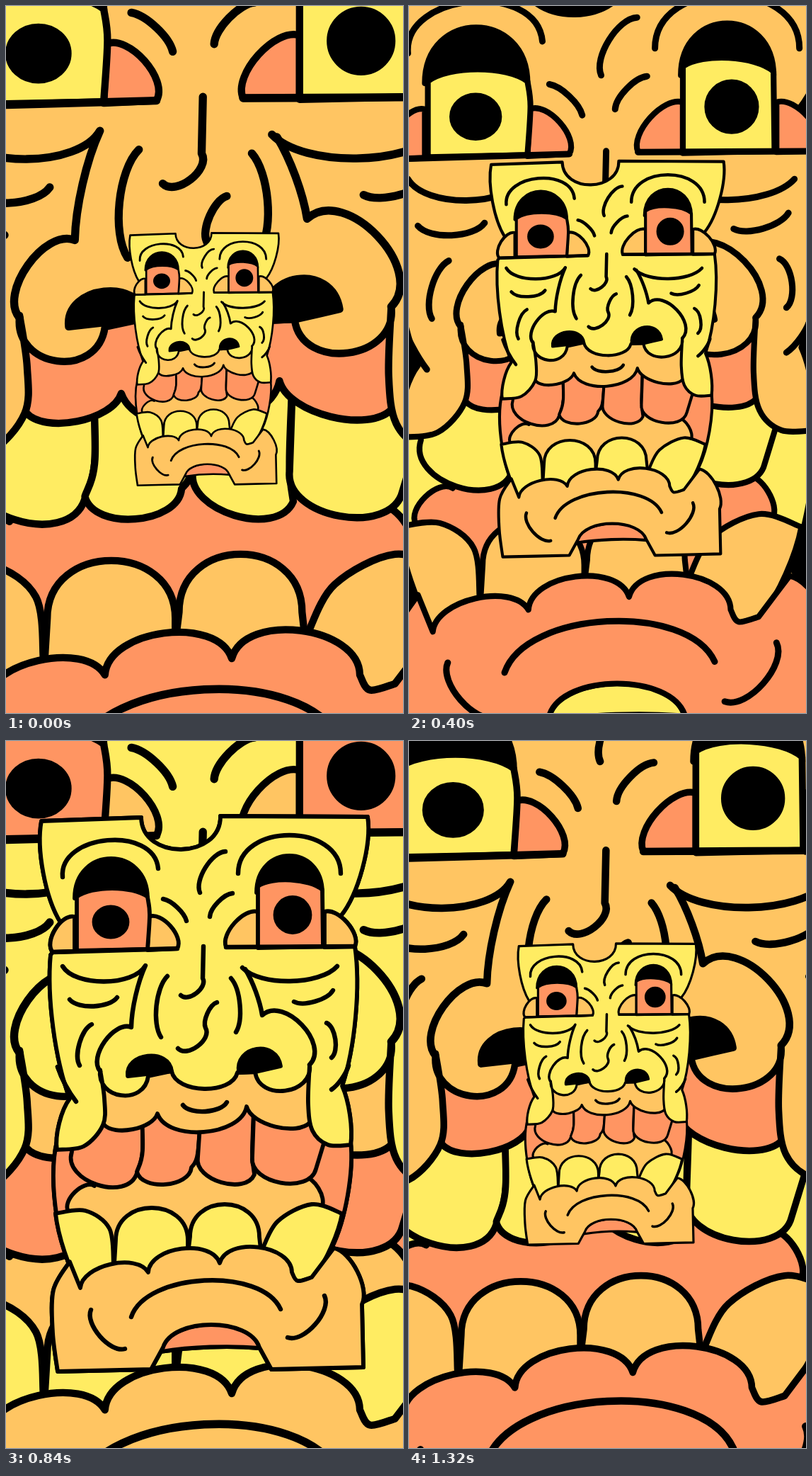
An HTML page with a canvas that plays this animation: 561 by 998 pixels, repeating every 1360 ms.

```html
<!DOCTYPE html>
<html>
<head>
<meta charset="utf-8">
<style>
html, body { margin: 0; width: 100%; height: 100%; overflow: hidden; background: #000; }
canvas { display: block; }
</style>
</head>
<body>
<canvas id="stage" width="561" height="998"></canvas>
<script>
const ctx = document.getElementById('stage').getContext('2d');
const YELLOW = '#ffec62', ORANGE = '#ffc562', CORAL = '#ff9562';
const CX = 280, CY = 499, SPREAD = 1.774;

// Arc from p to q that swells by `bulge` to the left of its direction.
function arcTo(path, p, q, bulge) {
  const dx = q[0] - p[0], dy = q[1] - p[1], len = Math.hypot(dx, dy);
  const inset = Math.max(0, 1 / 3 - Math.abs(bulge) / len);
  const push = bulge * 4 / 3 / len;
  path.bezierCurveTo(
    p[0] + dx * inset + dy * push, p[1] + dy * inset - dx * push,
    q[0] - dx * inset + dy * push, q[1] - dy * inset - dx * push, ...q);
}

function smoothTo(path, pts) {
  for (let i = 0; i + 1 < pts.length; i++) {
    const p = pts[i], q = pts[i + 1];
    const before = pts[i - 1] || p, after = pts[i + 2] || q;
    path.bezierCurveTo(
      p[0] + (q[0] - before[0]) / 6, p[1] + (q[1] - before[1]) / 6,
      q[0] - (after[0] - p[0]) / 6, q[1] - (after[1] - p[1]) / 6, ...q);
  }
}

// "x y | x y x y | ~bulge x y": pieces meet in corners; plain pieces are smooth, "~" is an arc.
function outline(text, closed) {
  const path = new Path2D();
  let last = null;
  for (const piece of text.split('|')) {
    const n = piece.replace('~', '').trim().split(/\s+/).map(Number);
    const bulge = piece.includes('~') ? n.shift() : null;
    const pts = [];
    for (let i = 0; i < n.length; i += 2) pts.push([n[i], n[i + 1]]);
    if (!last) path.moveTo(...pts[0]);
    else if (bulge !== null) arcTo(path, last, pts[0], bulge);
    else smoothTo(path, [last, ...pts]);
    last = pts[pts.length - 1];
  }
  if (closed) path.closePath();
  return path;
}

const parts = [];
const fill = (role, ...shapes) => shapes.forEach(s => parts.push({ role, path: outline(s, true) }));
const line = (...shapes) => shapes.forEach(s => parts.push({ path: outline(s) }));
function pupil(x, y, rx, ry) {
  const path = new Path2D();
  path.ellipse(x, y, rx, ry, 0, 0, 7);
  parts.push({ role: 'black', path });
}

// gums and mouth
fill('eye', '72 565 | ~-17 105 772 | 400 765 | 461 714 | ~-9 487 565');
fill('mid', '88 664 | ~13 125 628 | 125 582 | 420 582 | 420 615 | ~10 446 658 | 400 720 | 120 720');
// upper teeth
fill('eye',
  '92 500 | 93 580 | ~-33 185 610 | 193 578 191 500',
  '191 500 | 193 578 185 608 | ~-21 262 602 | 271 582 277 500',
  '277 500 | 271 588 | ~-24 351 612 | 348 580 351 500',
  '351 500 | 348 588 | ~-28 438 604 | 449 568 | 440 500');
// upper lip
fill('mid', '134 440 | 138 541 | ~-15 214 526 | ~-31 340 516 | ~-18 430 538 | 430 440');
line('250 514 | ~-11 312 510');
// lower teeth
fill('skin',
  '70 667 | 112 663 146 688 152 738 | 105 772 | ~5 70 667',
  '153 738 | 155 705 | ~46 257 705 | 257 716 | 201 760',
  '258 716 | 260 700 | ~46 358 700 | 360 718 | 302 750',
  '362 718 | 384 678 432 654 475 667 | ~5 435 757 | 410 764 | 388 740');
// tongue and chin
fill('eye', '219 862 | ~36 358 857 | ~-4 219 862');
fill('mid', '105 772 | ~23 201 750 | ~27 302 737 | ~29 404 750 | 412 762 432 757 | 463 716 | ~15 503 795 | ' +
  '505 884 | 375 887 | 358 856 | ~-32 222 856 | 205 887 | 73 890 | 66 835 67 775 90 735');
line('177 813 | ~46 388 802', '120 803 | ~-15 168 858', '450 783 | ~17 398 842');

// head, clockwise from the notch on the crown
fill('skin', '50 113 | 191 108 | ~-46 303 106 | 511 107 | ~12 473 247 | 493 290 | ~10 475 487 | ~5 487 570 | ' +
  '455 570 433 550 427 512 429 457 | ~32 352 467 | 327 468 | ~24 234 466 | 201 473 | ~32 133 464 | ' +
  '139 505 137 542 110 572 72 577 | ~6 90 505 | ~10 63 302 | 66 298 | 77 256 | ~11 50 113');
// eyes and their corners
fill('mid', '66 298 | ~14 97 248 | 97 297', '202 248 | ~14 242 293 | 200 295',
  '356 241 | ~-14 311 291 | 356 291', '450 241 | ~14 493 290 | 450 291');
fill('black', '97 222 | ~56 200 222', '354 214 | ~52 447 214');
fill('eye', '100 220 | ~12 200 220 | 203 245 200 294 | 100 296', '356 205 | ~11 447 210 | 448 290 | 356 292');
pupil(148, 255.5, 23.5, 21);
pupil(405, 245.5, 24.5, 24.5);
line('66 298 | 242 293', '311 291 | 493 290');
// brows and forehead
line('80 192 | ~46 215 180', '328 187 | ~54 473 187',
  '310 156 | ~-12 274 214', '222 223 | ~5 255 254', '288 248 | ~6 320 215');
// nose
line('279 290 | 278 335 | ~11 247 359', '298 369 | ~-6 282 405 | ~14 243 434',
  '228 332 | ~-11 219 418', '318 335 | ~9 325 411');
fill('black', '172 473 | ~25 234 466', '329 468 | ~29 388 459 | 353 467');
// cheeks
line('80 318 | ~-22 197 317 | ~-4 177 404 | ~-19 133 466', '468 318 | ~20 334 320',
  '338 322 | ~3 362 387 | ~31 429 457', '90 365 | ~-11 157 362', '407 368 | ~-8 462 352',
  '121 400 | ~-9 104 458', '453 398 | ~9 460 447', '73 460 | ~-2 99 509', '484 458 | ~3 460 492');

function drawFace(scale, skin, mid, eye) {
  const colours = { skin, mid, eye, black: '#000' };
  ctx.setTransform(scale, 0, 0, scale, CX * (1 - scale), CY * (1 - scale));
  for (const { role, path } of parts) {
    if (role) {
      ctx.fillStyle = colours[role];
      ctx.fill(path);
    }
    ctx.lineWidth = role ? 5.8 : 6.4;
    ctx.stroke(path);
  }
}

const STEP = 40, STEPS = 34, MEET = 21, RETURN = 14;

// 0: faces far apart, 1: both the same size. A slow start, then a quicker return cut short by the loop.
function closeness(step) {
  if (step > MEET) return 1 - ((step - MEET) / RETURN) ** 1.14;
  const x = step / MEET;
  return x - .037 * (1 - x) * Math.sin(2 * Math.PI * x);
}

function frame(now) {
  const step = Math.floor(now / STEP) % STEPS;
  const near = closeness(step);
  const front = .4545 + .5455 * near;
  const middle = SPREAD + (1 - SPREAD) * near;
  const back = SPREAD * (step <= MEET ? front : middle);

  ctx.setTransform(1, 0, 0, 1, 0, 0);
  ctx.fillStyle = ctx.strokeStyle = '#000';
  ctx.fillRect(0, 0, 561, 998);
  ctx.lineCap = ctx.lineJoin = 'round';
  drawFace(back, YELLOW, ORANGE, CORAL);
  drawFace(middle, ORANGE, CORAL, YELLOW);
  drawFace(front, YELLOW, ORANGE, CORAL);
  requestAnimationFrame(frame);
}
requestAnimationFrame(frame);
</script>
</body>
</html>
```
